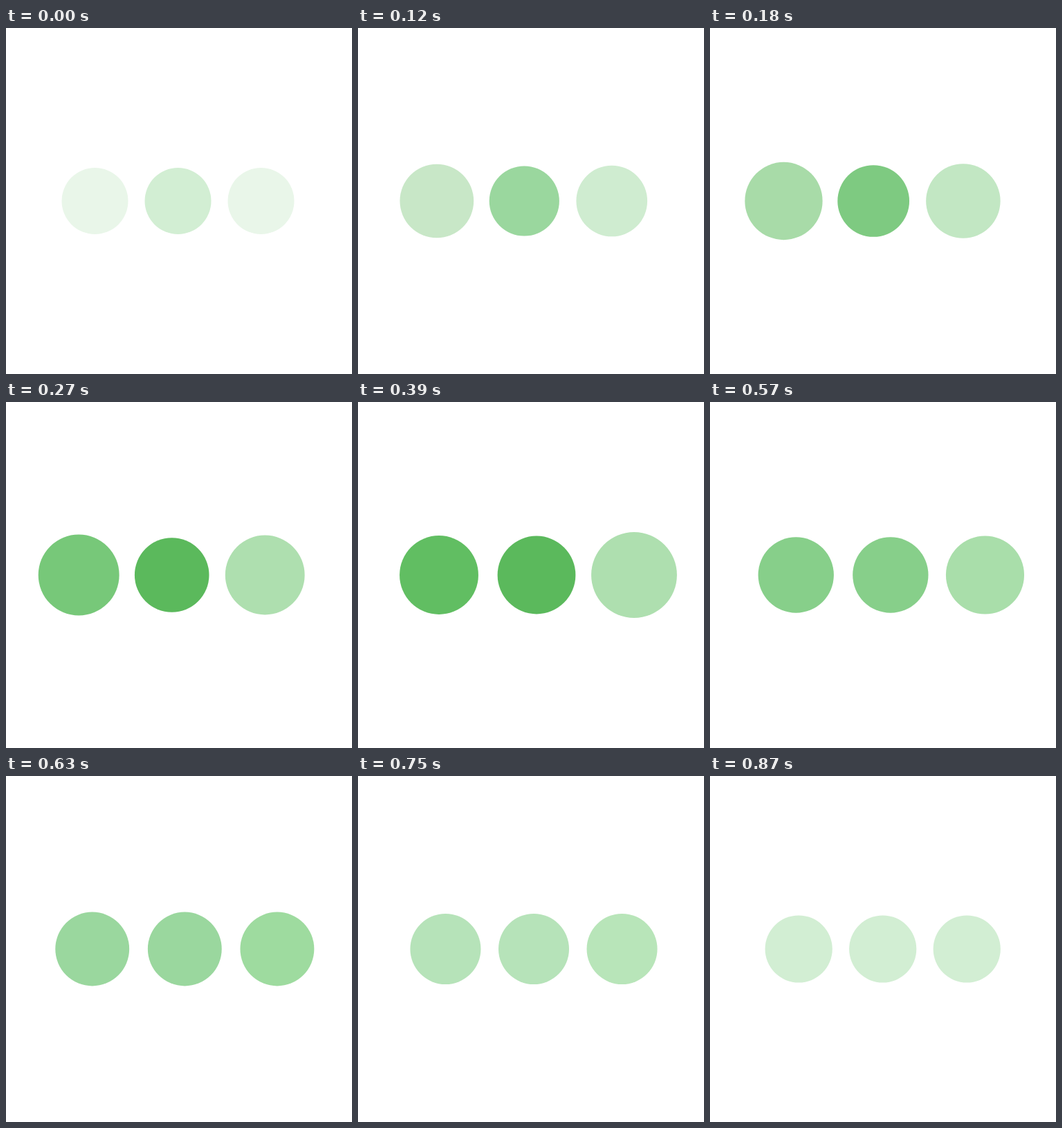
Write an HTML page that moves like this. It is 500 by 500 pixels and loops after 0.9 s.

```html
<!DOCTYPE html>
<html lang="en">
<head>
<meta charset="utf-8">
<title>Pulsing dots</title>
<style>
  html, body { margin: 0; width: 100%; height: 100%; overflow: hidden; background: #fff; }
  svg { display: block; width: 100%; height: 100%; }
</style>
</head>
<body>
<svg viewBox="0 0 500 500">
  <circle cy="250"/>
  <circle cy="250"/>
  <circle cy="250"/>
</svg>
<script>
const LOOP = 900, STEP = 30;
const RADIUS = 48, MID = 248.5, SPACING = 2.5;
const circles = document.querySelectorAll('circle');

// Tracks are lists of [time, value]; values are numbers or RGB triples.
const rowScale = [[0, 1], [435, 1.195], [900, 1]];
const rowShift = [[0, 0], [120, -8.2], [225, -15.4], [270, -8.8], [390, 9.5],
                  [445, 17.4], [480, 16.2], [630, 9.8], [870, 1.2], [900, 0]];

const rgb = hex => [1, 3, 5].map(i => parseInt(hex.slice(i, i + 2), 16));
const colors = (...keys) => keys.map(([t, hex]) => [t, rgb(hex)]);

const dots = [
  {
    grow: [[0, 1], [237, 1.108], [405, 1]],
    fill: colors([0, '#e9f6e9'], [120, '#c8e7c7'], [270, '#77c879'], [390, '#61be62'],
                 [435, '#5bb95c'], [480, '#6bc46c'], [630, '#9ad79e'], [870, '#d2eed3'])
  },
  {
    grow: [[0, 1]],
    fill: colors([0, '#d2eed3'], [120, '#9ad79e'], [255, '#5bb95c'], [435, '#5bb95c'],
                 [480, '#6bc46c'], [630, '#9ad79e'], [870, '#d2eed3'])
  },
  {
    grow: [[0, 1], [80, 1], [120, 1.015], [270, 1.067], [390, 1.098], [480, 1.092], [625, 1]],
    fill: colors([0, '#e9f6e9'], [120, '#cfecd0'], [270, '#aedfaf'], [540, '#aedfaf'],
                 [630, '#9edb9f'], [870, '#d2eed3'])
  }
];

const mix = (a, b, k) => Array.isArray(a) ? a.map((v, i) => mix(v, b[i], k)) : a + (b - a) * k;

function at(track, t) {
  const i = track.findIndex(key => key[0] > t);
  if (i < 0) return track[track.length - 1][1];
  const [t0, a] = track[i - 1], [t1, b] = track[i];
  return mix(a, b, (t - t0) / (t1 - t0));
}

function draw(t) {
  const r = RADIUS * at(rowScale, t);
  const mid = MID + at(rowShift, t);
  dots.forEach((dot, i) => {
    const c = circles[i];
    c.setAttribute('cx', mid + (i - 1) * SPACING * r);
    c.setAttribute('r', r * at(dot.grow, t));
    c.setAttribute('fill', `rgb(${at(dot.fill, t).map(Math.round)})`);
  });
}

const start = performance.now();
function frame() {
  const t = (performance.now() - start) % LOOP;
  draw(Math.floor(t / STEP) * STEP);
  requestAnimationFrame(frame);
}
frame();
</script>
</body>
</html>
```
